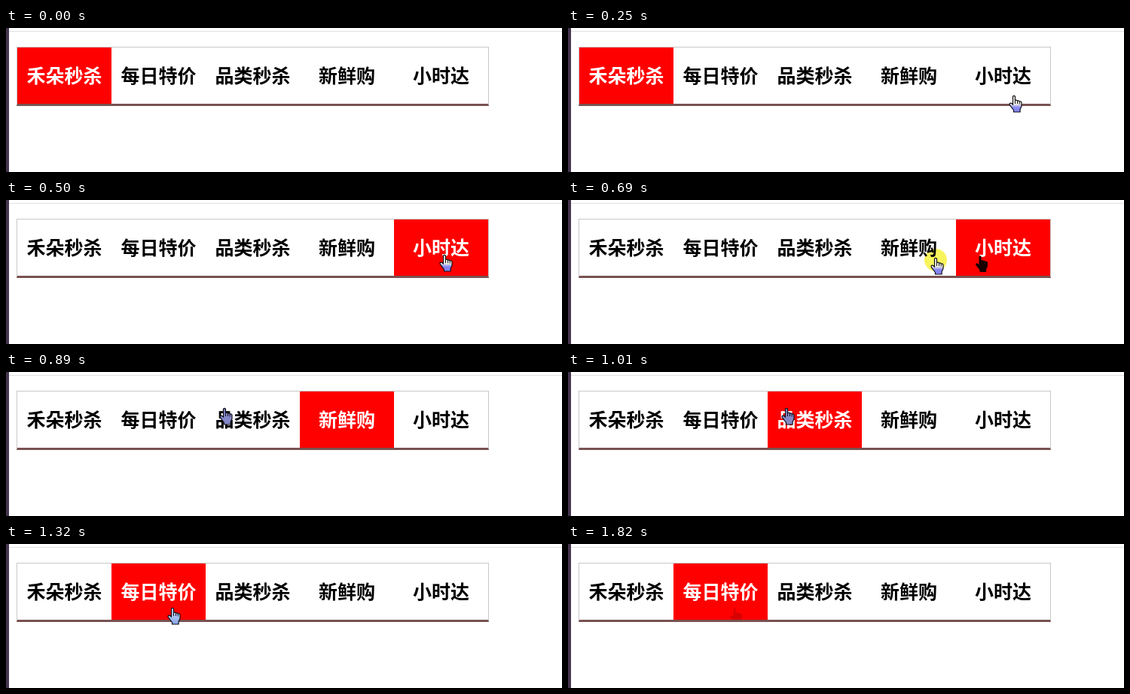
Recreate the animation shown at these times as an HTML page. Size 738 by 192 pixels, loop 1.95 s.

```html
<!DOCTYPE html>
<html lang="zh-CN">
<head>
<meta charset="utf-8">
<title>秒杀导航</title>
<style>
  html, body { margin: 0; width: 100%; height: 100%; overflow: hidden; background: #fff; }
  body { position: relative; }
  .strip { position: absolute; left: 0; top: 0; width: 4px; height: 100%; background: #46354f; }
  .rule { position: absolute; left: 4px; right: 0; top: 4px; height: 1px; background: #e1e1e1; }
  .tabs {
    position: absolute; left: 14px; top: 25px; display: flex; width: 625px; height: 75px;
    border: 1px solid #c8c8c8; border-bottom: 3px solid #795151;
  }
  .tab {
    width: 125px; height: 75px; text-align: center; white-space: nowrap; color: #000;
    font: bold 25px/73px "Noto Sans CJK SC", "Noto Sans CJK", sans-serif;
  }
  .tab.on { background: #f00; color: #fff; }
  svg { position: absolute; left: 0; top: 0; width: 738px; height: 192px; overflow: hidden; }
  .glow { mix-blend-mode: multiply; }
</style>
</head>
<body>
<div class="strip"></div>
<div class="rule"></div>
<div class="tabs">
  <div class="tab">禾朵秒杀</div>
  <div class="tab">每日特价</div>
  <div class="tab">品类秒杀</div>
  <div class="tab">新鲜购</div>
  <div class="tab">小时达</div>
</div>
<svg class="glow"><circle id="glow" r="15" fill="#f8f45c"/></svg>
<svg>
  <defs>
    <linearGradient id="violet" x2="0" y2="1">
      <stop offset=".5" stop-color="#f4f2e4"/><stop offset=".72" stop-color="#8586f2"/>
    </linearGradient>
    <linearGradient id="sky" x2="0" y2="1">
      <stop offset=".2" stop-color="#c5d8fa"/><stop offset="1" stop-color="#85a4e6"/>
    </linearGradient>
    <clipPath id="bar"><rect x="15" y="26" width="625" height="75"/></clipPath>
    <path id="hand" d="M5 1.2Q6.5-.5 8 1.2V6.4Q9.8 5.4 11 7Q12.6 6.3 13.7 8Q16 7.4 16.5 9.5V14.5L14.6 18.5V22H6V19.5L.8 12.7Q0 10.2 2 10.2Q3.5 10.2 5 12.2Z"/>
  </defs>
  <g clip-path="url(#bar)">
    <use id="shadow" href="#hand"/>
  </g>
  <g id="cursor" stroke="#101018" stroke-width="1.2" stroke-linejoin="round">
    <use href="#hand"/>
    <path d="M8 6.5V11M11 7V11M13.7 8V11.5" fill="none" stroke-width="1"/>
  </g>
</svg>
<script>
  const LOOP = 1950;

  // time, fingertip x, y, fill, pressed
  const cursorSteps = [
    [0, null],
    [60, 613, 156, 'url(#violet)'],
    [120, 608, 136, 'url(#violet)'],
    [190, 601, 112, 'url(#violet)'],
    [240, 592, 90, 'url(#violet)'],
    [310, 584, 76, 'url(#violet)'],
    [370, 582, 73, 'url(#violet)', true],
    [430, 582, 73, 'url(#violet)', true],
    [500, 582, 73, 'url(#violet)'],
    [570, 571, 73, 'url(#violet)'],
    [620, 546, 74, 'url(#violet)'],
    [690, 488, 77, 'url(#violet)', true],
    [760, 470, 75, 'url(#violet)'],
    [820, 385, 60, '#8488c8'],
    [890, 290, 48, '#8488c8'],
    [1080, 262, 60, '#8488c8'],
    [1140, 222, 77, 'url(#sky)'],
    [1190, 221, 85, 'url(#sky)', true],
    [1260, 221, 85, 'url(#sky)'],
    [1380, 300, 116, 'url(#sky)'],
    [1440, 410, 158, 'url(#sky)'],
    [1500, null]
  ];
  const tabSteps = [[0, 0], [500, 4], [760, 3], [1010, 2], [1260, 1]];
  // time, fingertip x, y, fill
  const shadowSteps = [
    [0, null], [690, 547, 74, '#180000'], [760, null], [1380, 221, 85, '#d90000']
  ];

  const byId = id => document.getElementById(id);
  const tabs = document.querySelectorAll('.tab');
  const at = (steps, time) => steps.findLast(step => step[0] <= time);

  function place(el, [, x, y, fill]) {
    el.style.display = x == null ? 'none' : '';
    if (x == null) return;
    el.setAttribute('transform', `translate(${x - 6.5} ${y})`);
    el.setAttribute('fill', fill);
  }

  function draw(now) {
    const time = now % LOOP;
    const pose = at(cursorSteps, time);
    const active = at(tabSteps, time)[1];
    tabs.forEach((tab, i) => tab.classList.toggle('on', i === active));
    place(byId('cursor'), pose);
    place(byId('shadow'), at(shadowSteps, time));

    const glow = byId('glow');
    glow.style.display = pose[4] ? '' : 'none';
    if (pose[4]) {
      glow.setAttribute('cx', pose[1]);
      glow.setAttribute('cy', pose[2] + 3);
    }
  }

  function tick() {
    draw(performance.now());
    requestAnimationFrame(tick);
  }
  tick();
</script>
</body>
</html>
```
